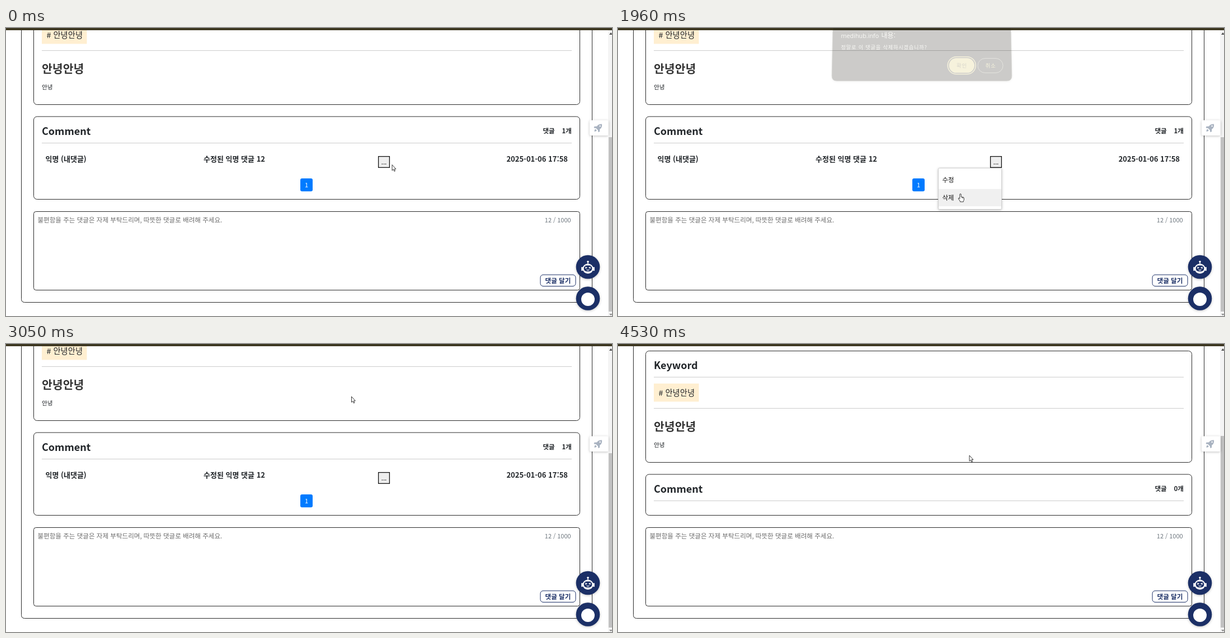
An HTML page that plays this animation: 1083x517 px, repeating every 5.08 s.

```html
<!DOCTYPE html>
<html lang="ko">
<head>
<meta charset="utf-8">
<title>Comment</title>
<style>
html, body { margin: 0; width: 100%; height: 100%; overflow: hidden; background: #fff; }
svg { display: block; width: 100%; height: 100%; }
text { font-family: "Noto Sans CJK KR", "Noto Sans KR", "Noto Sans CJK", sans-serif; white-space: pre; }
.box { fill: none; stroke: #2b2b2b; stroke-width: 1; }
.rule { stroke: #ccc; stroke-width: 1; }
.soft { filter: drop-shadow(0 1px 2px rgba(0, 0, 0, .25)); }
.small { letter-spacing: .8px; }
</style>
</head>
<body>
<svg id="stage" viewBox="0 0 1083 517" xmlns="http://www.w3.org/2000/svg"></svg>
<script>
const LOOP = 5080;
const DARK = '#212529', NAVY = '#1b2f66', GOLD = '#d9c867';

// Text placed by its vertical centre.
const label = (x, cy, size, str, { bold, fill = DARK, anchor = 'start', cls = '', font = '' } = {}) =>
  `<text x="${x}" y="${(cy + size * .37).toFixed(2)}" font-size="${size}" fill="${fill}" text-anchor="${anchor}"` +
  ` font-weight="${bold ? 700 : 400}" class="${cls}"${font && ` style="font-family:${font}"`}>${str}</text>`;
const rect = (x, y, w, h, r, attrs) =>
  `<rect x="${x}" y="${y}" width="${w}" height="${h}" rx="${r}" ${attrs}/>`;
const rule = y => `<path class="rule" d="M64 ${y}H1011"/>`;
const group = (id, inner, attrs = '') => `<g id="${id}" ${attrs}>${inner}</g>`;

const article =
  rect(49.5, 12.5, 976, 200, 6, 'class="box"') +
  label(64, 38, 18, 'Keyword', { bold: true }) + rule(59.5) +
  rect(64, 71, 80.5, 32.5, 0, 'fill="#ffefd1"') +
  label(72.5, 87.5, 14.3, '# 안녕안녕') + rule(115.5) +
  label(64, 148, 20.5, '안녕안녕', { bold: true, fill: '#333' }) +
  label(64, 181.5, 10.7, '안녕') +
  label(64, 260, 18, 'Comment', { bold: true }) + rule(281.5) +
  label(959.5, 259.5, 11.5, '댓글', { bold: true });

const row =
  label(70.5, 235, 13, '익명 (내댓글)', { bold: true }) +
  label(353, 235, 13, '수정된 익명 댓글 12', { bold: true }) +
  label(1004, 235, 13, '2025-01-06 17:58', { bold: true, anchor: 'end' }) +
  rect(665.6, 230.6, 19.8, 19.8, 0, 'fill="#efefef" stroke="#111" stroke-width="1.3"') +
  label(675.5, 240.5, 11.5, '...', { fill: '#000', anchor: 'middle' }) +
  rect(526, 270, 22, 23.3, 3, 'fill="#007bff"') +
  label(537, 282, 11, '1', { fill: '#fff', anchor: 'middle' });

const editor =
  rect(49.5, 329.5, 976, 141, 4, 'class="box"') +
  label(56.5, 345, 11.55, '불편함을 주는 댓글은 자제 부탁드리며, 따뜻한 댓글로 배려해 주세요.', { fill: '#6c6c6c' }) +
  label(1009.5, 345, 10.9, '12 / 1000', { fill: '#6c757d', anchor: 'end' }) +
  rect(955, 443, 63, 20.5, 5, `fill="#fff" stroke="${NAVY}"`) +
  label(986.5, 453.5, 11.6, '댓글 달기', { bold: true, fill: NAVY, anchor: 'middle' });

const scrollbar =
  rect(1076, 4, 7, 513, 0, 'fill="#f4f4f4"') +
  rect(1077, 196, 6, 313, 0, 'id="thumb" fill="#c1c1c1"') +
  '<path d="M1078 12l3-4l3 4z" fill="#505050"/><path d="M1078 513l3 3l3-3z" fill="#888"/>';

const rocket = rect(1043, 165.5, 34, 27.5, 3, 'fill="#fff" class="soft"') +
  rect(1076, 160, 1, 40, 0, 'fill="#f4f4f4"') +
  `<g fill="#a9b3c1"><path d="M1065 172.5c-4-.5-7 .8-9 4l-4.500.3c-.8 1.100-.8 2-.5 2.700l3.300.3l3.700 3.700l.3 3.200c1 .2 1.900 0 2.700-.7l.2-4.300c3.300-2.200 4.400-5.200 3.800-9.200z"/>
  <path d="M1053.500 181.500c-1.500.5-2 2.200-2 4.200c2 0 3.700-.5 4.200-2z"/></g><circle cx="1061.600" cy="176" r="1.200" fill="#fff"/>`;

const disc = `<circle r="21.3" fill="${NAVY}" class="soft"/>`;
const bot = disc +
  `<g fill="#fff"><circle cy="-9.500" r="1.800"/><rect x="-.7" y="-9" width="1.400" height="4"/>
  <rect x="-11.800" y="0" width="2.600" height="7" rx="1.200"/><rect x="9.200" y="0" width="2.600" height="7" rx="1.200"/>
  <ellipse cy="3" rx="9.600" ry="9"/></g>
  <rect x="-7.300" y="-2.800" width="14.600" height="10.800" rx="5" fill="${NAVY}"/>
  <path d="M-4.800 0l2.600 1.300l-2.600 1.300M4.800 0l-2.600 1.300l2.600 1.300M-2.500 4.600q2.500 2.400 5 0" fill="none" stroke="#fff" stroke-width="1.300"/>`;
const chat = disc + '<circle cy="1.500" r="12" fill="#fff"/>';

const menu =
  rect(572.5, 251.5, 113, 74, 2, 'fill="#fff" stroke="#d0d0d0" class="soft"') +
  rect(573, 289, 112, 31, 0, 'id="hover" fill="#f0f0f0"') +
  label(579.5, 273, 11.4, '수정', { fill: '#111' }) +
  label(579.5, 304.5, 11.4, '삭제', { fill: '#111' });

const pill = (x, str) =>
  rect(x, 64, 45.500, 26.500, 13.2, `fill="${GOLD}"`) +
  label(x + 23, 77, 9.5, str, { fill: '#554a1c', anchor: 'middle', cls: 'small' });
const ring = x => rect(x - 2.3, 61.7, 50.1, 31.1, 15.500, `fill="none" stroke="${GOLD}" stroke-width="1.500"`);
const confirmBody =
  label(398.5, 45, 9.2, '정말로 이 댓글을 삭제하시겠습니까?', { fill: '#e9e5d6', cls: 'small' }) +
  group('ring1', ring(591.5)) + pill(591.5, '확인') +
  rect(643, 64.5, 45, 26, 13, 'fill="none" stroke="#8d8870"') +
  label(666, 77, 9.5, '취소', { fill: GOLD, anchor: 'middle', cls: 'small' });
const alertBody =
  label(398.5, 45, 9.2, '댓글이 삭제되었습니다.', { fill: '#e9e5d6', cls: 'small' }) +
  group('ring2', ring(643)) + pill(643, '확인');
const dialog =
  '<path id="panel" fill="#1e1d15" stroke="#55523f" stroke-opacity=".6" class="soft"/>' +
  group('content',
    label(398.5, 24, 10.8, 'medihub.info', { fill: '#efebdc', font: "'Open Sans','Noto Sans',sans-serif" }) +
    label(470.5, 24, 12, '내용:', { fill: '#efebdc' }) +
    group('confirm', confirmBody) + group('alert', alertBody));

const pointer =
  '<circle id="click" r="8.300" fill="#f6ee3c" fill-opacity=".8"/>' +
  '<path id="arrow" d="M0 0V10.300L2.300 8.200L3.900 11.800L5.500 11.100L4 7.600H6.900Z" fill="#fff" stroke="#222" stroke-width=".9"/>' +
  '<path id="hand" d="M-1.200 7V.5Q-1.200-.8 0-.8T1.200.5V4.600L5 5.300Q6.300 5.600 6.300 7V9.500Q6.300 11 5.300 12.200V13.500H-.6V12.300L-3.300 8.600Q-4.200 7.200-3.200 6.700T-1.200 8ZM3 5.500V7M4.700 5.800V7.200" fill="#fff" stroke="#222" stroke-width=".9"/>';

document.getElementById('stage').innerHTML =
  rect(0, 0, 1083, 517, 0, 'fill="#fff"') +
  '<path class="box" d="M27.500 0V486.500Q27.500 492.500 33.500 492.500H1041.500Q1047.500 492.500 1047.500 486.500V0"/>' +
  group('article', article) +
  '<rect id="comments" x="49.500" width="976" rx="6" class="box"/>' +
  '<text id="count" x="993.500" font-size="11.5" font-weight="700" fill="#212529"></text>' +
  group('row', row) + editor + scrollbar + rocket +
  group('bot', bot) + group('chat', chat) + group('menu', menu) +
  rect(0, 0, 1083, 4, 0, 'fill="#3d3721"') +
  group('dialog', dialog) + group('pointer', pointer);

const el = {};
document.querySelectorAll('[id]').forEach(n => el[n.id] = n);
const set = (id, attrs) => { for (const k in attrs) el[id].setAttribute(k, attrs[k]); };
const show = (id, on) => set(id, { visibility: on ? 'inherit' : 'hidden' });
const move = (id, x, y) => set(id, { transform: `translate(${x.toFixed(2)} ${y.toFixed(2)})` });
const clamp = v => Math.min(1, Math.max(0, v));
const within = (t, a, b) => t >= a && t < b;

// Pointer hot spot: time, x, y
const path = [
  [0, 690, 245.5], [450, 690, 245.5], [600, 685, 243],
  [1190, 685, 243], [1350, 664, 204], [1490, 640, 250], [1580, 619, 288], [1690, 612, 298.5],
  [1965, 612, 298.5], [2130, 616, 220], [2300, 620, 125], [2430, 618, 96], [2640, 614, 84],
  [2930, 614, 84], [3070, 618, 96], [3290, 630.5, 141],
  [3540, 630.5, 141], [3690, 624, 135], [3830, 624, 135], [4040, 625, 201], [4530, 628, 200]
];
function pointerAt(t) {
  const i = path.findIndex(k => k[0] > t);
  if (i < 0) return path[path.length - 1].slice(1);
  const [a, b] = [path[i - 1], path[i]], q = (t - a[0]) / (b[0] - a[0]);
  return [a[1] + (b[1] - a[1]) * q, a[2] + (b[2] - a[2]) * q];
}

// 0 = dialog fully open, 1 = gone
function tilt(t, open, close) {
  if (t < open || t > close + 150) return 1;
  return t < close ? (1 - clamp((t - open) / 230)) ** 2 : (t - close) / 150;
}

function drawDialog(t) {
  const second = t > 3040;
  const d = second ? tilt(t, 3060, 3720) : tilt(t, 1950, 2870);
  const y = -11 * d, top = 1 + y, end = 105 + y, l = 384 - 2 * d, r = 702 + 2 * d;
  set('dialog', { opacity: (1 - d ** 2.6).toFixed(3) });
  set('panel', {
    d: `M393 ${top}H693Q702 ${top} 702 ${top + 9}L${r} ${end - 9}Q${r} ${end} ${r - 9} ${end}` +
       `H${l + 9}Q${l} ${end} ${l} ${end - 9}L384 ${top + 9}Q384 ${top} 393 ${top}Z`
  });
  move('content', 0, y);
  show('confirm', !second);
  show('alert', second);
  show('ring1', t < 2780);
  show('ring2', t < 3720);
}

function draw(t) {
  const removed = t >= 3790, shift = removed ? 0 : -75;
  move('article', 0, shift);
  set('comments', { y: 234 + shift, height: 73.5 - shift });
  set('count', { y: 263.8 + shift });
  el.count.textContent = removed ? '0개' : '1개';
  set('thumb', { y: removed ? 165 : 196, height: removed ? 344 : 313 });
  show('row', !removed);

  const lift = removed ? (1 - clamp((t - 3830) / 690)) ** 2 : 0;
  move('bot', 1040, 429 - 3 * lift);
  move('chat', 1040, 485.5 - 5 * lift);

  const [x, y] = pointerAt(t);
  const open = within(t, 940, 2890);
  const inMenu = open && t < 2040 && x > 572 && x < 686 && y > 251 && y < 326;
  const inButton = t < 2000 && x > 665 && x < 687 && y > 230 && y < 251;
  const hand = inMenu || inButton;
  show('menu', open);
  show('hover', t > 1560);
  drawDialog(t);

  move('pointer', x, y);
  show('hand', hand);
  show('arrow', !hand);
  show('click', within(t, 870, 940) || within(t, 1820, 1960) || within(t, 2780, 2870));
}

const start = performance.now();
function tick() {
  draw((performance.now() - start) % LOOP);
  requestAnimationFrame(tick);
}
tick();
</script>
</body>
</html>
```
